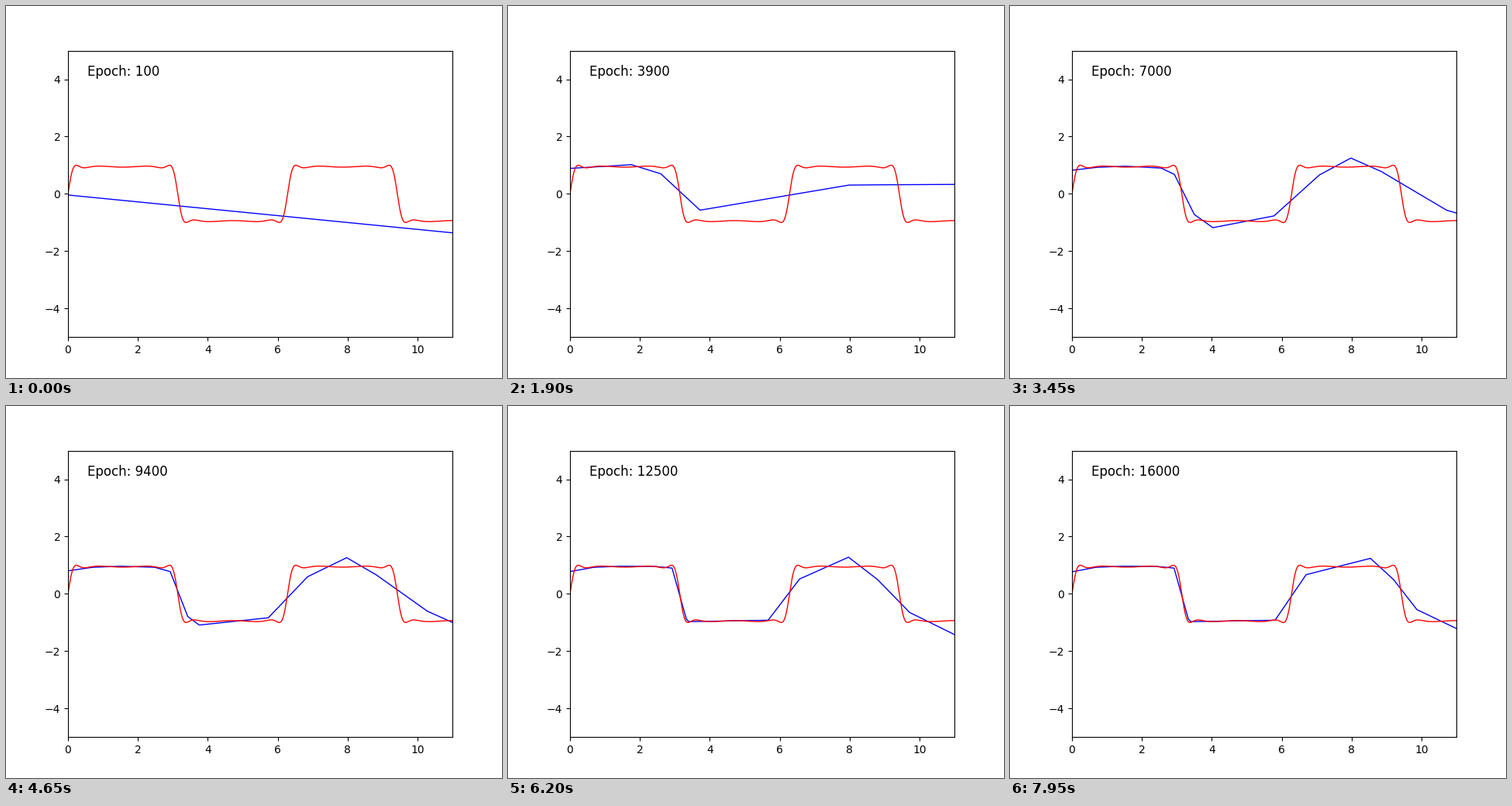
A matplotlib script that plays this animation: 640x480 px, repeating every 8000 ms.

```python
import numpy as np
import matplotlib.pyplot as plt
from matplotlib.animation import FuncAnimation

FRAMES, INTERVAL = 160, 50
STEPS = [0, 23, 38, 69, 124, 159]
EASE = [4, 1, 3, 1, 1]  # ease-out power of each stage

# Key bends (x, y) of the fit: two rough early shapes, then the full one.
ROUGH = [(.65, 1.03), (1.65, .8), (3.77, -.18), (8, -.06), (11, -.02)]
BETTER = [(1.75, 1.02), (2.6, .7), (3.72, -.57), (8, .31), (11, .33)]
FORMED = [(2.55, .9), (2.93, .68), (3.5, -.72), (4.03, -1.18), (5.78, -.77),
          (7.08, .66), (7.98, 1.25), (8.85, .78), (10.72, -.57), (11, -.67)]
LEFT = [(2.4, .96), (2.92, .9), (3.33, -.88), (3.4, -.97)]
RIGHT = [(5.67, -.92), (6.57, .52), (7.97, 1.28), (8.8, .5), (9.72, -.65), (11, -1.42)]
LATE = [(5.81, -.92), (6.7, .67), (8.54, 1.24), (9.2, .5), (9.87, -.55), (11, -1.21)]


def refine(rough):
    """Bends that have not formed yet lie on the rough curve."""
    rough = np.array(rough)
    bends = np.array(FORMED)
    bends[[0, 1, 3]] = rough[:3]
    bends[:, 1] = np.interp(bends[:, 0], *rough.T)
    return bends


def with_plateau(step, bends):
    """Prepend the sinking start and the gentle rise up to the first bend."""
    crest = bends[0][0]
    start = .76 + .18 * np.exp(-(step - STEPS[1]) / 45)
    rise = [(0, start), (.28 * crest, .925), (.6 * crest, .965)]
    return np.vstack([rise, bends])


shapes = [refine(ROUGH), refine(BETTER), FORMED, LEFT + RIGHT, LEFT + LATE]
poses = [with_plateau(s, b) for s, b in zip(STEPS[1:], shapes)]
line_x = poses[0][:, 0]
poses.insert(0, np.column_stack([line_x, -.04 - .12 * line_x]))


def fitted(step):
    k = min(np.searchsorted(STEPS, step, side="right"), len(EASE)) - 1
    t = (step - STEPS[k]) / (STEPS[k + 1] - STEPS[k])
    t = 1 - (1 - t) ** EASE[k]
    return (poses[k] + (poses[k + 1] - poses[k]) * t).T


def wave(x):
    y = np.sin(x)
    for _ in range(3):
        y = np.sin(2 * y)
    return y


fig, ax = plt.subplots(figsize=(6.4, 4.8), dpi=100)
ax.set_xlim(0, 11)
ax.set_ylim(-5, 5)
fit_line, = ax.plot(*fitted(0), color="blue", lw=1)
x = np.linspace(0, 11, 1101)
ax.plot(x, wave(x), color="red", lw=1)
label = ax.text(.05, .95, "", transform=ax.transAxes, fontsize=12, va="top")


def update(step):
    fit_line.set_data(*fitted(step))
    label.set_text(f"Epoch: {100 * (step + 1)}")
    return fit_line, label


anim = FuncAnimation(fig, update, frames=FRAMES, interval=INTERVAL,
                     repeat=True, repeat_delay=0)
plt.show()
```
